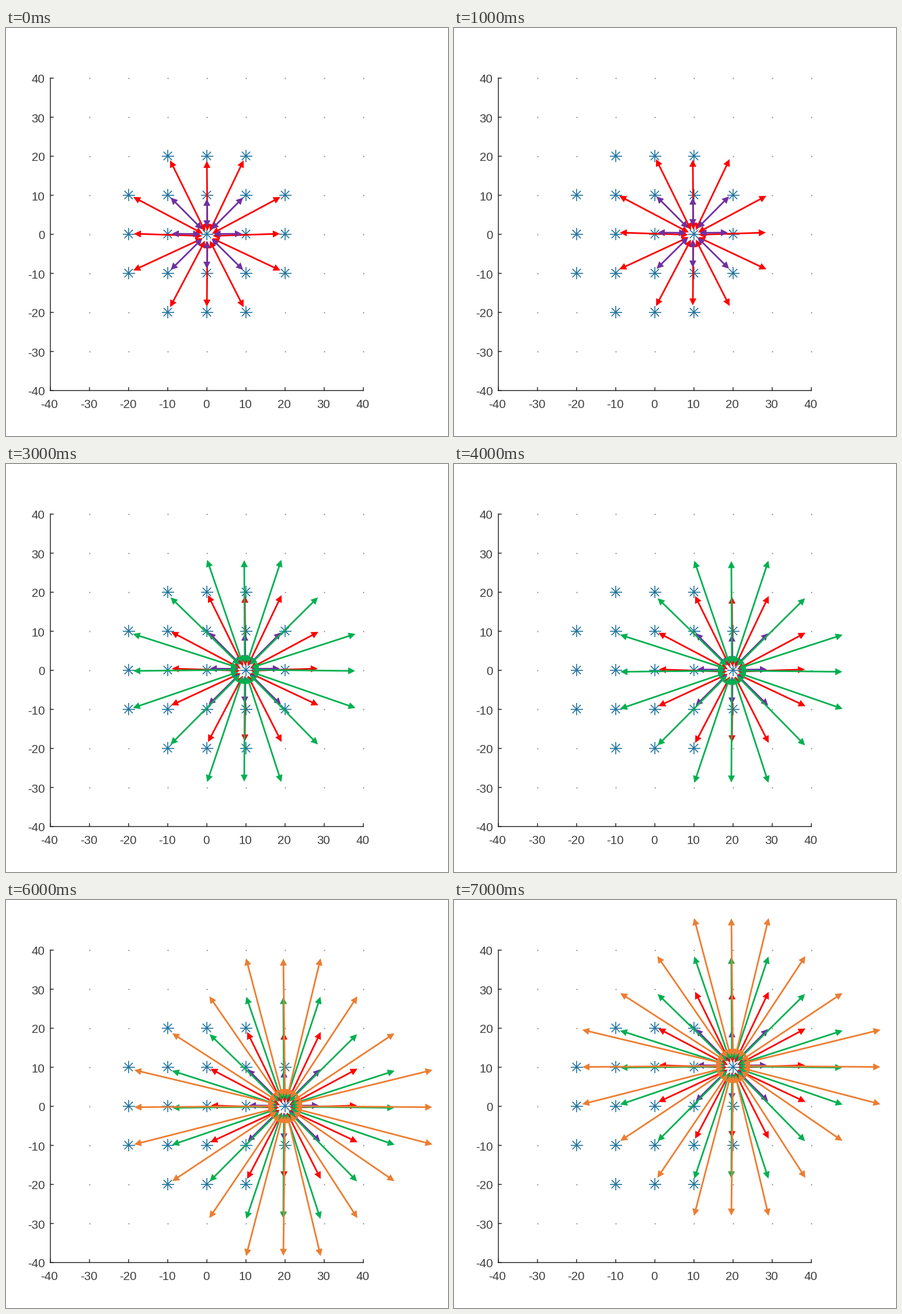
Recreate the animation shown at these times as a matplotlib script. Size 757 by 700 pixels, loop 8000 ms.

```python
import numpy as np
import matplotlib.pyplot as plt
from itertools import product
from matplotlib.animation import FuncAnimation
from matplotlib.collections import LineCollection, PolyCollection

W, H, DPI = 757, 700, 100
PX = 72 / DPI            # points per pixel
ORIGIN = np.array([344, 353.5])
CELL = 67                # pixels between grid nodes
HEAD = 12                # arrow head length and width
INK = "#262626"
NODES = range(-4, 5)

fig = plt.figure(figsize=(W / DPI, H / DPI), dpi=DPI, facecolor="white")
ax = fig.add_axes([0, 0, 1, 1])
ax.set_xlim(0, W)
ax.set_ylim(H, 0)
ax.axis("off")


def to_px(col, row):
    return ORIGIN + CELL * np.array([col, -row])


def draw_axes():
    left, bottom = to_px(-4, -4)
    right, top = to_px(4, 4)
    lines = [[(left, top), (left, bottom)], [(left, bottom), (right, bottom)]]
    style = dict(family="Liberation Sans", fontsize=20.5 * PX,
                 color="#404040", va="baseline")
    for n in NODES:
        x, y = to_px(n, n)
        lines += [[(x, bottom), (x, bottom - 5)], [(left, y), (left + 5, y)]]
        ax.text(x - 1.5, 651.5, str(10 * n), ha="center", **style)
        ax.text(66.5, y + 9, str(10 * n), ha="right", **style)
    ax.add_collection(LineCollection(lines, colors=INK, linewidths=1.5 * PX,
                                     capstyle="projecting", zorder=1))
    dots = [to_px(c, r) for c, r in product(NODES[1:], repeat=2)]
    ax.plot(*zip(*dots), ls="", marker="s", ms=1.8 * PX, mew=0,
            color="#777777", zorder=1)


def draw_stars():
    arms = []
    for c, r in product(range(-2, 3), repeat=2):
        if abs(c * r) == 4:      # the corners stay empty
            continue
        center = to_px(c, r)
        for arm in ((10.5, 0), (0, 10.5), (7.2, 7.2), (7.2, -7.2)):
            arms.append([center - arm, center + arm])
    ax.add_collection(LineCollection(arms, colors="#1f719c",
                                     linewidths=1.6 * PX, zorder=2))


def ring(k):
    """Offsets of the grid nodes about k cells away from the hub."""
    return [np.array(p) for p in product(NODES, repeat=2)
            if round(1.1 * np.hypot(*p) - 0.1) == k]


class Burst:
    """Double-headed arrows from a movable hub to one ring of nodes."""

    def __init__(self, k, color, base, gap, drift):
        self.base, self.gap = np.array(base), gap
        trim = 5 + 2 * k         # tips stop short of their nodes
        self.tips = [p * (CELL - trim / np.hypot(*p)) + drift for p in ring(k)]
        self.shafts = LineCollection([], colors=color, linewidths=2.8 * PX,
                                     capstyle="butt", zorder=k + 3)
        self.heads = PolyCollection([], facecolors=color, edgecolors="none",
                                    zorder=k + 3.1)
        ax.add_collection(self.shafts)
        ax.add_collection(self.heads)

    def place(self, center, shown):
        lines, heads = [], []
        for tip in self.tips if shown else []:
            u = (tip - self.base) / np.hypot(*(tip - self.base))
            n = np.array([-u[1], u[0]]) * HEAD / 2
            a, b = center + self.base + u * self.gap, center + tip
            lines.append([a + u * 8, b - u * 8])
            for p, d in ((a, u * HEAD), (b, -u * HEAD)):
                heads.append([p, p + d + n, p + d - n])
        self.shafts.set_segments(lines)
        self.heads.set_verts(heads)


red = Burst(2, "#ff0000", (1, 4), 9, (0, 0))
purple = Burst(1, "#7030a0", (0, 0.5), 11.5, (0, 0))
green = Burst(3, "#00b050", (0, 2), 12, (-1, 4))
orange = Burst(4, "#ed7d31", (2, 1), 17, (-1, 3))
purple.shafts.set_zorder(5.2)    # the short arrows cover the red ones
purple.heads.set_zorder(5.3)
BURSTS = [red, purple, green, orange]

# One step per second: hub position and number of bursts shown
START, RIGHT, EDGE, UP = (344, 353), (409, 351), (476, 352.5), (476, 283.5)
STEPS = [(START, 2), (RIGHT, 2), (RIGHT, 2), (RIGHT, 3),
         (EDGE, 3), (EDGE, 3), (EDGE, 4), (UP, 4)]


def update(i):
    center, count = STEPS[i]
    for n, burst in enumerate(BURSTS):
        burst.place(np.array(center), n < count)
    return []


draw_axes()
draw_stars()
anim = FuncAnimation(fig, update, frames=len(STEPS), interval=1000,
                     repeat=True, repeat_delay=0, blit=False)
plt.show()
```
